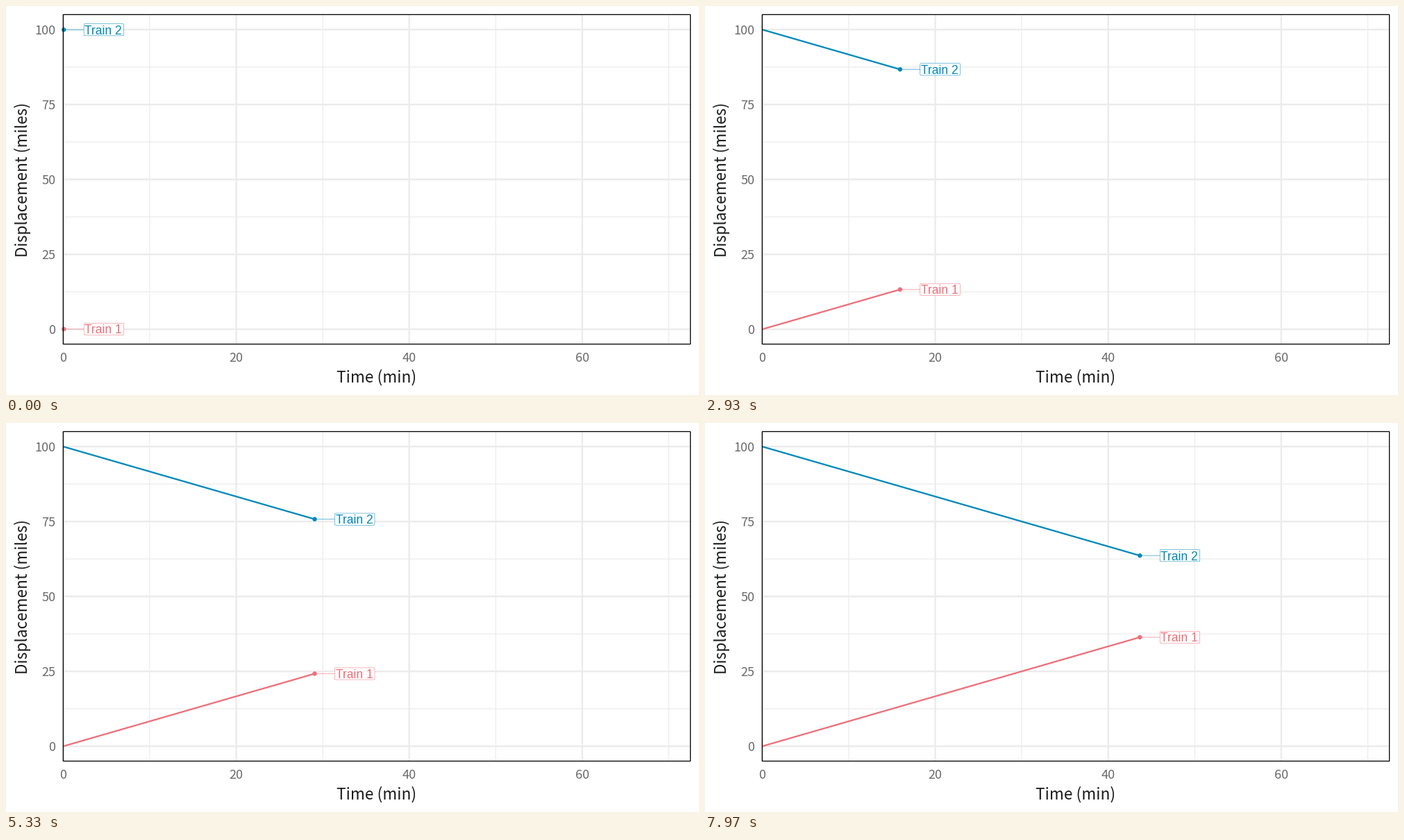
Animation, 998 px wide and 561 px high, one loop 8000 ms. Source, as a matplotlib script:

```python
import matplotlib.pyplot as plt
from matplotlib.animation import FuncAnimation
from matplotlib.patches import Circle, FancyBboxPatch, Rectangle

W, H, DPI = 998, 561, 64
FRAMES, LOOP_MS = 240, 8000
LEFT, RIGHT, TOP, BOTTOM = 82.4, 985.6, 12.4, 487.6
PX_MIN, PX_MILE, ZERO_Y = 12.458, 4.322, 466.2
START_MIN, STEP_MIN = 0.07, 0.18236
SPEED = 50 / 60
GRID = "#ebebeb"
UI_FONT = "Noto Sans CJK JP"


def pt(px):
    return px * 72 / DPI


def px_x(minutes):
    return LEFT + minutes * PX_MIN


def px_y(miles):
    return ZERO_Y - miles * PX_MILE


fig = plt.figure(figsize=(W / DPI, H / DPI), dpi=DPI, facecolor="white")
ax = fig.add_axes([0, 0, 1, 1])
ax.set(xlim=(0, W), ylim=(H, 0))
ax.axis("off")


def rule(xs, ys, width):
    ax.plot(xs, ys, color=GRID, lw=pt(width), solid_capstyle="butt",
            snap=False, zorder=1)


def words(x, y, s, size, color, **kw):
    return ax.text(x, y, s, fontsize=pt(size), color=color,
                   va="baseline", **{"family": UI_FONT, "weight": "light", **kw})


for i in range(9):
    y = px_y(12.5 * i)
    rule((LEFT, RIGHT), (y, y), 1.2 if i % 2 else 2.4)
    if i % 2 == 0:
        words(71.5, y + 7, f"{12.5 * i:.0f}", 18.2, "#6a6a6a", ha="right")
for i in range(8):
    x = px_x(10 * i)
    rule((x, x), (TOP, BOTTOM), 1.2 if i % 2 else 2.4)
    if i % 2 == 0:
        words(x, 513, str(10 * i), 18.2, "#6a6a6a", ha="center")

words(534, 542.5, "Time (min)", 22.6, "#1c1c1c", ha="center")
ax.text(31, 250, "Displacement (miles)", fontsize=pt(22.6), color="#1c1c1c",
        family=UI_FONT, weight="light", rotation=90, rotation_mode="anchor",
        ha="center", va="baseline")
ax.add_patch(Rectangle((LEFT, TOP), RIGHT - LEFT, BOTTOM - TOP, fill=False,
                       ec="black", lw=pt(1.3), snap=False, zorder=6))


class Train:
    def __init__(self, name, start, speed, color):
        self.start, self.speed = start, speed
        self.path, = ax.plot([], [], color=color, lw=pt(2.3), zorder=3,
                             solid_capstyle="butt")
        self.dot = Circle((0, 0), 3.2, fc=color, ec="none", zorder=4,
                          clip_on=False)
        self.link, = ax.plot([], [], color=color, alpha=0.5, lw=pt(1.2),
                             zorder=4, snap=False, solid_capstyle="butt")
        self.box = FancyBboxPatch((0, 0), 57.6, 17.2, fc="white", zorder=5,
                                  boxstyle="round,pad=0,rounding_size=1.5",
                                  ec=color, lw=pt(0.5), snap=False)
        ax.add_patch(self.dot)
        ax.add_patch(self.box)
        self.label = words(0, 0, name, 17.5, color, family="Liberation Sans",
                           weight="normal", zorder=5.5)

    def move(self, minutes):
        x = px_x(minutes)
        y = px_y(self.start + self.speed * minutes)
        self.path.set_data((LEFT, x), (px_y(self.start), y))
        self.dot.center = x, y
        self.link.set_data((x, x + 29), (y, y))
        self.box.set_x(x + 28.9)
        self.box.set_y(y - 8.6)
        self.label.set_position((x + 30.2, y + 6.5))


trains = [Train("Train 1", 0, SPEED, "#ee6f7a"),
          Train("Train 2", 100, -SPEED, "#0089bb")]


def update(frame):
    for train in trains:
        train.move(START_MIN + STEP_MIN * frame)
    return []


anim = FuncAnimation(fig, update, frames=FRAMES, interval=LOOP_MS / FRAMES,
                     init_func=lambda: update(0), repeat=True, repeat_delay=0)
plt.show()
```
